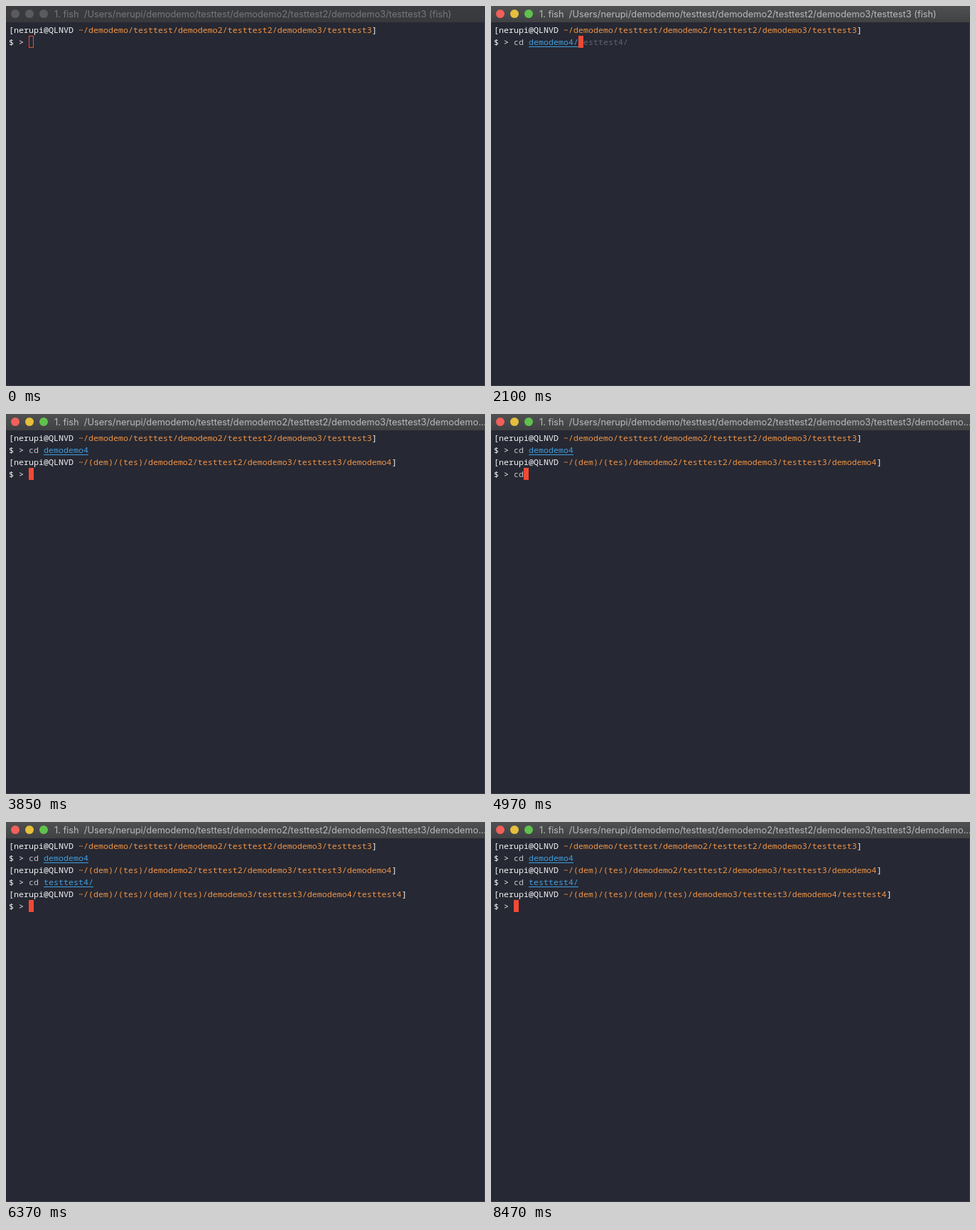
An HTML page with a canvas that plays this animation: 674 by 536 pixels, repeating every 8.54 s.

```html
<!DOCTYPE html>
<html lang="en">
<head>
<meta charset="utf-8">
<title>Terminal</title>
<style>
html, body { margin: 0; width: 100%; height: 100%; overflow: hidden; background: #262833; }
canvas { display: block; }
</style>
</head>
<body>
<canvas id="stage" width="674" height="536"></canvas>
<script>
const ctx = document.getElementById('stage').getContext('2d');
const W = 674, H = 536, LOOP = 8540;
const LEFT = 4, TOP = 25, CELL = 7, ROW = 17, BAR = 23;
const FOCUS = 630;
const USER = 'nerupi', HOST = 'QLNVD';
const COLOR = {
  back: '#262833', edge: '#3d3e47', text: '#f4f4f4', path: '#f29545',
  command: '#c2c3c6', arg: '#3f9fe0', hint: '#62646b', cursor: '#f04a35'
};
const LIGHTS = ['#f2605a', '#e5bf3c', '#5fc24c'];

// Pick the size at which one monospace cell is exactly CELL wide.
const MONO = '"Noto Sans Mono", "DejaVu Sans Mono", monospace';
ctx.font = `100px ${MONO}`;
const monoFont = `${100 * CELL / ctx.measureText('m').width}px ${MONO}`;
const titleFont = '12.8px Inter, "Liberation Sans", sans-serif';

const home = `/Users/${USER}/demodemo/testtest/demodemo2/testtest2/demodemo3/testtest3`;
const prompts = [
  '~/demodemo/testtest/demodemo2/testtest2/demodemo3/testtest3',
  '~/(dem)/(tes)/demodemo2/testtest2/demodemo3/testtest3/demodemo4',
  '~/(dem)/(tes)/(dem)/(tes)/demodemo3/testtest3/demodemo4/testtest4'
];
// Each key: time, typed text, suggestion
const sessions = [
  { enter: 3220, keys: [
    [980, 'c'], [1120, 'cd'], [1190, 'cd '], [1330, 'cd d'], [1540, 'cd de'],
    [1680, 'cd dem'], [1890, 'cd demodemo4/', 'testtest4/'],
    [2310, 'cd demodemo4', '/testtest4/']] },
  { enter: 6300, keys: [
    [4830, 'c'], [4970, 'cd'], [5110, 'cd '], [5250, 'cd t'], [5390, 'cd te'],
    [5600, 'cd testtest4/']] },
  { enter: Infinity, keys: [] }
];

function put(text, col, row, color) {
  ctx.fillStyle = color;
  ctx.fillText(text, LEFT + col * CELL, TOP + row * ROW + 13);
}

function drawBar(active, title) {
  const shade = ctx.createLinearGradient(0, 0, 0, BAR);
  shade.addColorStop(0, active ? '#4f5052' : '#3b3c3f');
  shade.addColorStop(1, active ? '#404143' : '#38393c');
  ctx.fillStyle = shade;
  ctx.fillRect(0, 0, W, BAR);
  LIGHTS.forEach((color, i) => {
    ctx.fillStyle = active ? color : '#5b5b5d';
    ctx.beginPath();
    ctx.arc(13 + 20 * i, 11, 6, 0, 2 * Math.PI);
    ctx.fill();
  });
  ctx.font = titleFont;
  ctx.fillStyle = active ? '#b9babb' : '#77787a';
  ctx.fillText(title, 68, 16);
}

function drawPrompt(path, row) {
  const who = `[${USER}@${HOST} `;
  put(who, 0, row, COLOR.text);
  put(path, who.length, row, COLOR.path);
  put(']', who.length + path.length, row, COLOR.text);
  put('$ >', 0, row + 1, COLOR.text);
}

function drawInput(text, row) {
  const arg = text.slice(3);
  put(text.slice(0, 2), 4, row, COLOR.command);
  put(arg, 7, row, COLOR.arg);
  ctx.fillRect(LEFT + 7 * CELL, TOP + row * ROW + 15, arg.length * CELL, 1);
}

function drawCursor(col, row, solid) {
  const x = LEFT + col * CELL, y = TOP + row * ROW;
  ctx.fillStyle = ctx.strokeStyle = COLOR.cursor;
  if (solid) ctx.fillRect(x, y, CELL, ROW);
  else ctx.strokeRect(x + 0.5, y + 0.5, CELL - 1, ROW - 1);
}

function draw(time) {
  const current = sessions.findIndex(s => time < s.enter);
  const active = time >= FOCUS;
  ctx.fillStyle = COLOR.back;
  ctx.fillRect(0, 0, W, H);
  drawBar(active, '1. fish  ' + home + (current ? '/demodemo...' : ' (fish)'));

  ctx.font = monoFont;
  for (let i = 0; i <= current; i++) {
    const row = 2 * i;
    const [, text = '', hint = ''] = sessions[i].keys.filter(k => k[0] <= time).pop() || [];
    drawPrompt(prompts[i], row);
    drawInput(text, row + 1);
    if (i === current) {
      put(hint, 4 + text.length, row + 1, COLOR.hint);
      drawCursor(4 + text.length, row + 1, active);
    }
  }
  ctx.fillStyle = COLOR.edge;
  ctx.fillRect(W - 1, BAR, 1, H);
  ctx.fillRect(0, H - 1, W, 1);
}

function tick(now) {
  draw(now % LOOP);
  requestAnimationFrame(tick);
}
requestAnimationFrame(tick);
</script>
</body>
</html>
```
